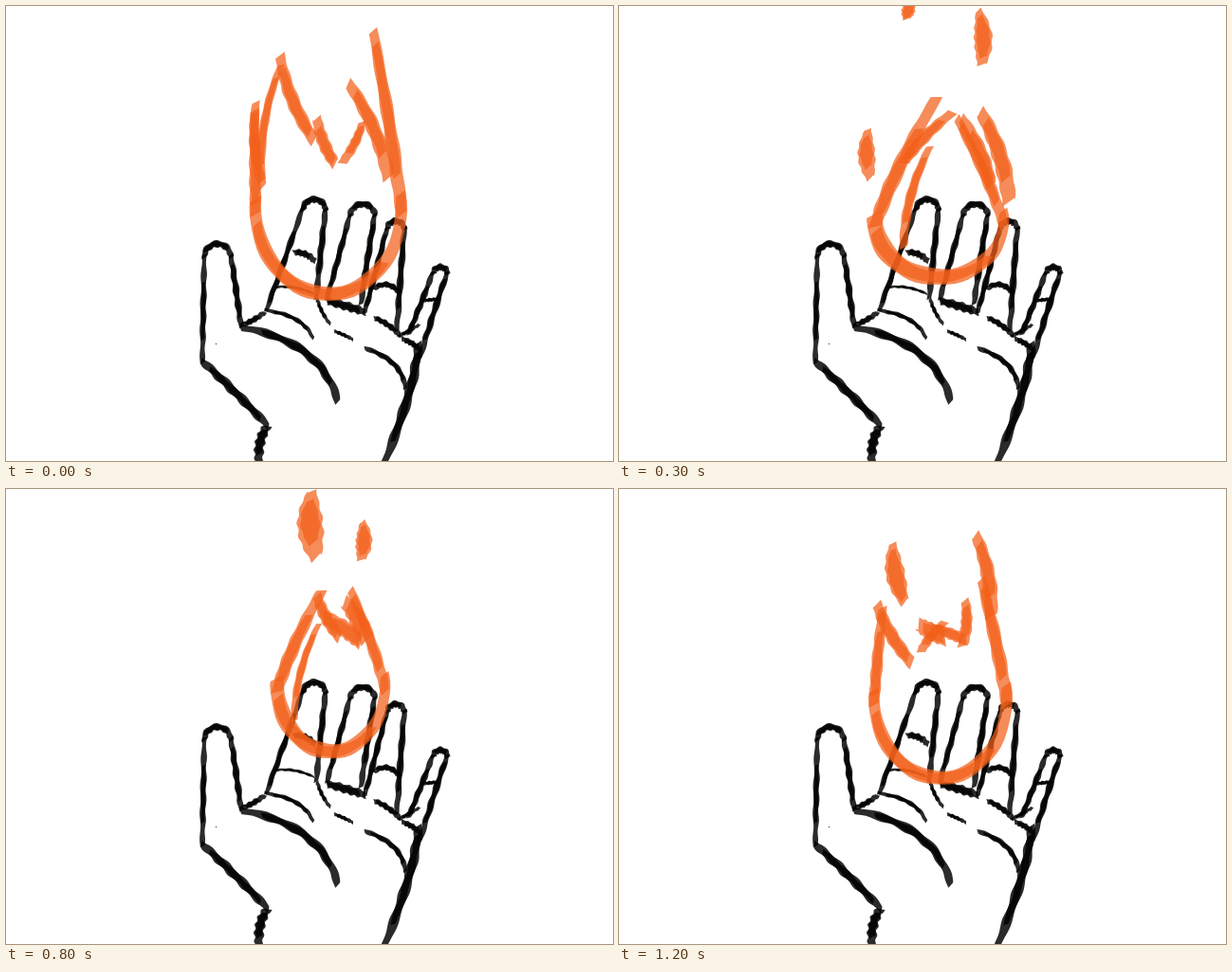
Write an HTML page with a canvas that moves like this. It is 640 px wide and 480 px high and loops after 1300 ms.

```html
<!DOCTYPE html>
<html lang="en">
<head>
<meta charset="utf-8">
<title>Flame in hand</title>
<style>
html, body { margin: 0; width: 100%; height: 100%; overflow: hidden; background: #fff; }
canvas { display: block; }
</style>
</head>
<body>
<canvas id="stage" width="640" height="480"></canvas>
<script>
const ctx = document.getElementById('stage').getContext('2d');
const STEP = 100, LOOP = 1300, N = 36;
const INK = 'rgba(0,0,0,.83)', FIRE = 'rgba(243,96,26,.72)';

let seed = 1;
const random = () => (seed = seed * 16807 % 2147483647) / 2147483647;
const mix = (a, b, f) => a + (b - a) * f;
const sample = fn => Array.from({ length: N + 1 }, (_, i) => fn(i / N));

// How the brush width runs along a stroke.
const even = u => .7 + .3 * Math.sqrt(Math.max(0, Math.sin(Math.PI * u)));
const lick = u => .55 + .45 * Math.sin(Math.PI * (.1 + .7 * u));
const leaf = u => .22 + .78 * Math.sin(Math.PI * (.04 + .86 * u));

const curve = (x0, y0, cx, cy, x1, y1) => sample(u => [
  mix(mix(x0, cx, u), mix(cx, x1, u), u),
  mix(mix(y0, cy, u), mix(cy, y1, u), u)
]);
const arc = (cx, cy, rx, ry, from, to) => sample(u => {
  const a = mix(from, to, u);
  return [cx + rx * Math.cos(a), cy - ry * Math.sin(a)];
});

// Flat brush with slanted ends and a softly uneven edge.
function ribbon(pts, width, shape, rough, from = 0, to = N) {
  const left = [], right = [], phase = random() * 6;
  for (let i = from; i <= to; i++) {
    const [x, y] = pts[i];
    const a = pts[Math.max(0, i - 1)], b = pts[Math.min(N, i + 1)];
    const dx = b[0] - a[0], dy = b[1] - a[1], len = Math.hypot(dx, dy) || 1;
    const tx = dx / len, ty = dy / len;
    const half = width / 2 * shape((i - from) / (to - from));
    const slant = i === from || i === to ? half * .6 : 0;
    const hl = half * (1 + rough * Math.sin(i * .9 + phase));
    const hr = half * (1 + rough * Math.sin(i * .7 + 2 * phase));
    left.push([x - ty * hl + tx * slant, y + tx * hl + ty * slant]);
    right.unshift([x + ty * hr - tx * slant, y - tx * hr - ty * slant]);
  }
  ctx.beginPath();
  left.concat(right).forEach(p => ctx.lineTo(...p));
  ctx.fill();
}

// One pass, then a darker overlap along a random stretch of it.
function paint(pts, width, shape = even, rough = .08) {
  ribbon(pts, width, shape, rough);
  const from = Math.floor(N * (.05 + .2 * random()));
  const to = Math.floor(N * (.7 + .25 * random()));
  ribbon(pts, width * .75, shape, rough, from, to);
}

// left base, right base, centre of the round tip, its radius
const fingers = [
  [207, 377, 248, 339, 223, 265, 14],
  [274, 322, 327, 309, 325, 216, 12],
  [338, 310, 374, 315, 376, 222, 13],
  [378, 324, 412, 343, 411, 236, 9],
  [424, 347, 436, 372, 458, 283, 7.5]
];
// width, start, a point halfway, end
const lines = [
  [9, 247, 339, 316, 366, 350, 418],
  [9, 206, 374, 240, 406, 277, 444],
  [10, 276, 443, 268, 460, 267, 482],
  [10, 435, 355, 425, 408, 399, 482],
  [4.5, 273, 321, 306, 331, 324, 351],
  [4, 328, 308, 333, 322, 342, 336],
  [4, 346, 343, 356, 347, 366, 352],
  [5.5, 378, 361, 409, 378, 421, 404],
  [6, 248, 337, 261, 331, 273, 323],
  [3, 283, 297, 304, 297, 325, 304],
  [7, 303, 260, 316, 262, 326, 270],
  [9, 338, 311, 360, 317, 379, 323],
  [6, 387, 299, 402, 294, 416, 304],
  [6, 388, 329, 402, 336, 416, 348],
  [6, 417, 351, 428, 356, 437, 363],
  [4, 413, 349, 424, 343, 436, 336],
  [4, 438, 311, 447, 310, 456, 309]
];

function drawHand() {
  ctx.fillStyle = INK;
  const ink = (width, ...p) => paint(curve(...p), width, even, .2);
  for (const [lx, ly, rx, ry, x, y, r] of fingers) {
    ink(6, lx, ly, mix(lx, x - r, .5), mix(ly, y, .5), x - r, y - 3);
    paint(arc(x, y, r, r, Math.PI * 1.02, -.05), 7, even, .2);
    ink(6.5, x + r, y - 3, mix(rx, x + r, .45), mix(ry, y, .5), rx, ry);
  }
  for (const [w, x0, y0, mx, my, x1, y1] of lines) {
    ink(w, x0, y0, 2 * mx - (x0 + x1) / 2, 2 * my - (y0 + y1) / 2, x1, y1);
  }
  ctx.fillRect(221, 356, 1, 1);
}

// bowl: centre, radii, width at the left and right; left/right: tips of the sides.
// Tongues n..y and sparks a..e: tip, root, width.
const poses = {
  0: {
    bowl: [340, 212, 77, 92, 16, 14], left: [262, 110], right: [387, 26],
    n: [289, 52, 325, 142, 14], v: [328, 118, 347, 167, 13], w: [376, 122, 354, 166, 10],
    u: [361, 81, 403, 182, 15], x: [264, 101, 271, 191, 11], y: [290, 62, 270, 185, 9]
  },
  100: {
    bowl: [339, 215, 79, 82, 14, 15], left: [320, 7], right: [385, 125],
    n: [330, 38, 327, 118, 13], v: [335, 82, 354, 161, 13], w: [325, 85, 376, 184, 13],
    u: [373, 34, 387, 154, 22], x: [421, 180, 404, 209, 18]
  },
  300: {
    bowl: [338, 225, 68, 61, 22, 12], left: [335, 96], right: [356, 118],
    n: [352, 112, 300, 166, 12], v: [361, 118, 392, 190, 14], w: [328, 148, 300, 255, 10],
    u: [381, 111, 411, 207, 17],
    a: [263, 130, 265, 182, 18], b: [379, 4, 382, 62, 19], c: [310, -6, 303, 14, 14]
  },
  600: {
    bowl: [344, 222, 59, 62, 18, 13], left: [327, 48], right: [378, 95],
    n: [338, 63, 333, 127, 13], v: [336, 88, 368, 188, 14], w: [303, 172, 290, 245, 11],
    u: [345, 96, 392, 158, 15], x: [278, 182, 285, 228, 10],
    a: [269, 25, 271, 56, 13], d: [310, -8, 311, 19, 15]
  },
  800: {
    bowl: [343, 206, 57, 71, 19, 12], left: [333, 107], right: [363, 106],
    n: [328, 112, 352, 157, 13], v: [335, 134, 374, 162, 17], w: [330, 142, 304, 245, 8],
    u: [357, 118, 380, 160, 18],
    d: [323, 2, 327, 73, 27], e: [376, 34, 374, 75, 17]
  },
  1000: {
    bowl: [341, 210, 67, 80, 14, 14], left: [298, 131], right: [384, 112],
    n: [298, 138, 316, 163, 12], v: [316, 160, 340, 146, 11], w: [340, 140, 369, 155, 12],
    u: [373, 52, 368, 145, 22], x: [387, 114, 345, 150, 12],
    d: [302, 22, 308, 119, 21]
  },
  1200: {
    bowl: [339, 220, 70, 85, 15, 14], left: [278, 125], right: [382, 95],
    n: [272, 121, 309, 184, 14], v: [316, 142, 344, 158, 18], w: [344, 140, 318, 172, 10],
    u: [376, 48, 392, 135, 15], x: [365, 117, 362, 166, 12], y: [330, 146, 366, 160, 12],
    d: [289, 57, 301, 120, 20]
  }
};
const times = Object.keys(poses).map(Number);

function poseAt(t) {
  if (poses[t]) return poses[t];
  const n = times.findIndex(v => v > t);
  const t0 = times[n - 1], t1 = times[n], a = poses[t0], b = poses[t1], out = {};
  for (const k in a) {
    if (b[k]) out[k] = a[k].map((v, i) => mix(v, b[k][i], (t - t0) / (t1 - t0)));
  }
  return out;
}

function drawFlame({ bowl, left, right, ...parts }) {
  const [cx, cy, rx, ry, wl, wr] = bowl;
  ctx.fillStyle = FIRE;
  const blend = u => mix(wl, wr, u) / wl * even(u);
  paint(arc(cx, cy, rx, ry, Math.PI * .97, Math.PI * 2.05), wl, blend);
  // Each side leaves its tip and meets the bowl almost upright.
  const side = ([x, y], edge, w) =>
    paint(curve(x, y, mix(edge, x, .2), mix(cy, y, .3), edge, cy + 8), w, lick);
  side(left, cx - rx, mix(wl, 10, .6));
  side(right, cx + rx, wr);
  for (const [key, [x0, y0, x1, y1, w]] of Object.entries(parts)) {
    const mx = (x0 + x1) / 2, my = (y0 + y1) / 2;
    const bend = Math.sign(mx - cx) * .12 * Math.hypot(x1 - x0, y1 - y0);
    paint(curve(x0, y0, mx + bend, my, x1, y1), w, key < 'f' ? leaf : lick);
  }
}

function draw(t) {
  ctx.fillStyle = '#fff';
  ctx.fillRect(0, 0, 640, 480);
  seed = 7;
  drawHand();
  drawFlame(poseAt(t));
}

const start = performance.now();
let shown = -1;
function tick() {
  const t = Math.floor((performance.now() - start) % LOOP / STEP) * STEP;
  if (t !== shown) draw(shown = t);
  requestAnimationFrame(tick);
}
tick();
</script>
</body>
</html>
```
